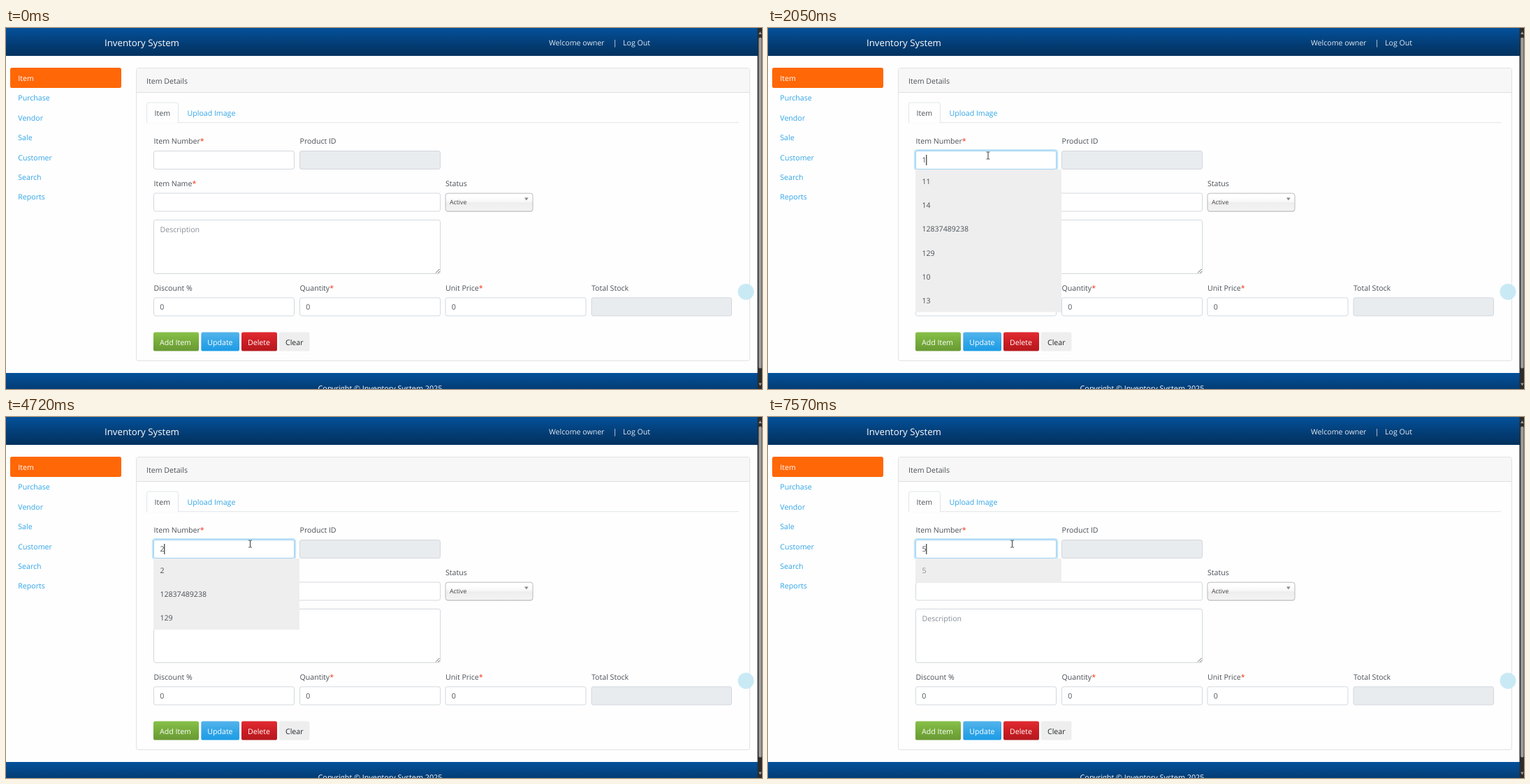
An HTML page for the animation above (8000 ms loop, 1082 by 518 pixels).

```html
<!DOCTYPE html>
<html lang="en">
<head>
<meta charset="utf-8">
<title>Inventory System</title>
<style>
html, body { margin: 0; width: 100%; height: 100%; overflow: hidden; background: #fefefe; }
svg { display: block; width: 1082px; height: 518px; }
text { font: 10.6px "Open Sans", "Noto Sans", sans-serif; fill: #495057; text-rendering: geometricPrecision; white-space: pre; }
.link { fill: #2fa4e7; }
.light { fill: #fff; }
.soft { fill: #e4eaf0; }
.muted { fill: #868e96; }
.dark { fill: #212529; }
.star { fill: #f5331b; }
.brand { font-size: 13.25px; }
.small { font-size: 8.8px; fill: #444; }
.foot { font-size: 10.8px; }
</style>
</head>
<body>
<svg id="stage" viewBox="0 0 1082 518"></svg>
<script>
const LOOP = 8000;
const stage = document.getElementById('stage');

const text = (x, y, s, cls = '') => `<text x="${x}" y="${y}" class="${cls}">${s}</text>`;
const rect = (x, y, w, h, fill, more = '') =>
  `<rect x="${x}" y="${y}" width="${w}" height="${h}" fill="${fill}" ${more}/>`;
const box = (x, y, w, h, fill = '#fff', line = '#ced4da') =>
  rect(x + .5, y + .5, w - 1, h - 1, fill, `rx="2.6" stroke="${line}" stroke-width=".9"`);
const label = (x, y, s, must) =>
  text(x, y, s + (must ? '<tspan class="star">*</tspan>' : ''));
const gradient = (id, ...stops) =>
  `<linearGradient id="${id}" x2="0" y2="1">${stops.map(([at, c]) =>
    `<stop offset="${at}" stop-color="${c}"/>`).join('')}</linearGradient>`;
const glossy = (id, a, b, c) => gradient(id, [0, a], [.6, b], [1, c]);
const button = (x, w, s, fill, cls = 'light') =>
  rect(x, 436.5, w, 27, fill, 'rx="2.6"') + text(x + 9, 455, s, cls);

const menu = ['Item', 'Purchase', 'Vendor', 'Sale', 'Customer', 'Search', 'Reports'];

stage.innerHTML = `<defs>
  ${glossy('navy', '#04519b', '#033c73', '#02325f')}
  ${glossy('green', '#88c149', '#73a839', '#699934')}
  ${glossy('blue', '#54b4eb', '#2fa4e7', '#1d9ce5')}
  ${glossy('red', '#e12b31', '#c71c22', '#b5191f')}
  ${gradient('select', [.2, '#fff'], [.5, '#f6f6f6'], [.52, '#eee'], [1, '#f4f4f4'])}
</defs>
${rect(0, 0, 1082, 518, '#fefefe')}
${rect(0, 0, 1076, 40, 'url(#navy)')}
${text(141, 26, 'Inventory System', 'brand light')}
${text(777, 25, 'Welcome owner', 'soft')}${text(868.5, 25, '|', 'soft')}${text(883, 25, 'Log Out', 'soft')}

${rect(6, 57, 159, 29, '#ff6707', 'rx="2.8"')}
${menu.map((s, i) => text(17.3, 76 + 28.4 * i, s, i ? 'link' : 'light')).join('')}

${box(186, 57, 879, 421, '#fefefe', '#dfdfdf')}
${rect(187, 58, 877, 34, '#f7f7f7')}${rect(187, 92, 877, 1, '#dfdfdf')}
${text(201, 80, 'Item Details')}
${rect(201, 135.3, 848, .9, '#dee2e6')}
<path d="M201.5 136.2V109.5q0-2.5 2.5-2.5h40q2.5 0 2.5 2.5v26.7" fill="#fefefe" stroke="#dee2e6" stroke-width=".9"/>
${text(212.5, 126, 'Item')}${text(259.5, 126, 'Upload Image', 'link')}

${label(211.5, 166, 'Item Number', 1)}${label(420.5, 166, 'Product ID')}
${box(211, 176, 202, 27)}${box(420, 176, 202, 27, '#e9ecef')}
${label(211.5, 227, 'Item Name', 1)}${label(629, 227, 'Status')}
${box(211, 236.5, 411, 27)}
${rect(629.5, 238, 124.5, 26, '#000', 'rx="3.5" opacity=".1"')}
${rect(629, 237.2, 125, 25.8, 'url(#select)', 'rx="3.5" stroke="#aaa" stroke-width=".8"')}
${text(635, 253, 'Active', 'small')}
<path d="M742 243.5h5.6l-2.8 4z" fill="#888"/>
${box(211, 275, 411, 78)}${text(220.5, 292.5, 'Description', 'muted')}
<path d="M615 351.5l5.5-5.5M618.3 351.7l2.4-2.4" stroke="#555" stroke-width=".9"/>

${label(211.5, 377, 'Discount %')}${label(420.5, 377, 'Quantity', 1)}
${label(629, 377, 'Unit Price', 1)}${label(838, 377, 'Total Stock')}
${[211, 420, 628.5].map(x => box(x, 386.5, 202, 27) + text(x + 9.3, 404.2, '0')).join('')}
${box(837.5, 386.5, 201.5, 27, '#e9ecef')}

${button(211, 65, 'Add Item', 'url(#green)')}${button(279.3, 54.7, 'Update', 'url(#blue)')}
${button(337, 51, 'Delete', 'url(#red)')}${button(391, 43.5, 'Clear', '#eee', 'dark')}

${rect(0, 495, 1076, 40, 'url(#navy)')}
<text x="535.5" y="521" text-anchor="middle" class="foot light">Copyright © Inventory System 2025</text>
<circle cx="1059" cy="378.5" r="11.5" fill="#c9eaf5"/>
${rect(1075.5, 0, 6.5, 518, '#2c2c2c')}
${rect(1077.3, 13.5, 4.2, 475, '#9f9f9f', 'rx="2.1"')}
<path d="M1077.2 9l2.2-4 2.2 4zM1077.2 509.5l2.2 4 2.2-4z" fill="#9f9f9f"/>

<g id="focus"><rect x="210" y="175" width="204" height="29" rx="3.7" fill="none" stroke="#2fa4e7" stroke-opacity=".3" stroke-width="2.2"/>
${box(211, 176, 202, 27, '#fff', '#97d1f3')}</g>
<text id="value" x="220.4" y="193.3"></text>
<rect id="caret" y="182" width="1" height="15" fill="#111"/>
<g id="list"></g>
<g id="mouse">
  <path id="arrow" d="M0 0V9.8L2.3 7.8 3.8 11 5.2 10.4 3.8 7.2H6.9Z" fill="#fff" stroke="#111" stroke-width=".7"/>
  <path id="beam" d="M-2.3-5h1.6L0-4.4.7-5h1.6M0-4.4V4.4M-2.3 5h1.6L0 4.4.7 5h1.6" fill="none" stroke="#222" stroke-width=".9"/>
</g>`;

// Each track holds [start time, ...state] and keeps a state until the next one.
const mouseTrack = [
  [250, 809, 416, 'arrow'], [310, 735, 368, 'arrow'], [380, 675, 334, 'arrow'],
  [650, 590, 292, 'beam'], [720, 430, 214, 'arrow'], [780, 353, 181, 'beam'],
  [980, 343, 181.5, 'beam'], [1050, 325, 182.5, 'beam'], [1120, 315, 183, 'beam'],
  [4650, 335, 182, 'beam'], [4720, 349.5, 182, 'beam']
];
const focusTrack = [[0, 0], [1320, .2], [1390, .6], [1450, .88], [1520, 1]];
const valueTrack = [[0, ''], [1990, '1'], [3190, ''], [3520, '2'], [5250, ''], [5580, '3'], [6370, ''], [7500, '5']];
const caretTrack = [[0, 0], [1320, 1], [1850, 0], [1990, 1], [2520, 0], [3060, 1], [4060, 0],
  [4590, 1], [5120, 0], [5250, 1], [6110, 0], [6640, 1], [7110, 0], [7500, 1]];
const listTrack = [[0, ''], [2050, '1'], [3660, '2'], [5640, '3'], [7570, '5']];
const matches = {
  '': [], 1: [11, 14, 12837489238, 129, 10, 13], 2: [2, 12837489238, 129],
  3: [3, 12837489238, 13], 5: [5]
};

const at = (track, t) => track.findLast(step => step[0] <= t);
const el = Object.fromEntries([...stage.querySelectorAll('g[id],text[id],rect[id],path[id]')].map(e => [e.id, e]));
const show = (e, on) => e.setAttribute('visibility', on ? 'visible' : 'hidden');
let shown = '';

function drawList(key) {
  if (key === shown) return;
  shown = key;
  const items = matches[key], row = 34.1;
  el.list.innerHTML = items.length ? rect(211, 203, 209, row * items.length, '#eee') +
    items.map((n, i) => text(220.4, 224.2 + row * i, n, key === '5' ? 'muted' : '')).join('') : '';
}

function draw(now) {
  const t = now % LOOP;
  const [, x, y, shape] = at(mouseTrack, t) || [0, 0, 0, ''];
  el.mouse.setAttribute('transform', `translate(${x} ${y})`);
  show(el.arrow, shape === 'arrow');
  show(el.beam, shape === 'beam');
  el.focus.setAttribute('opacity', at(focusTrack, t)[1]);
  const value = at(valueTrack, t)[1];
  el.value.textContent = value;
  el.caret.setAttribute('x', value ? 226.3 : 220.6);
  show(el.caret, at(caretTrack, t)[1]);
  drawList(at(listTrack, t)[1]);
}

const start = performance.now();
function tick() {
  draw(performance.now() - start);
  requestAnimationFrame(tick);
}
tick();
</script>
</body>
</html>
```
